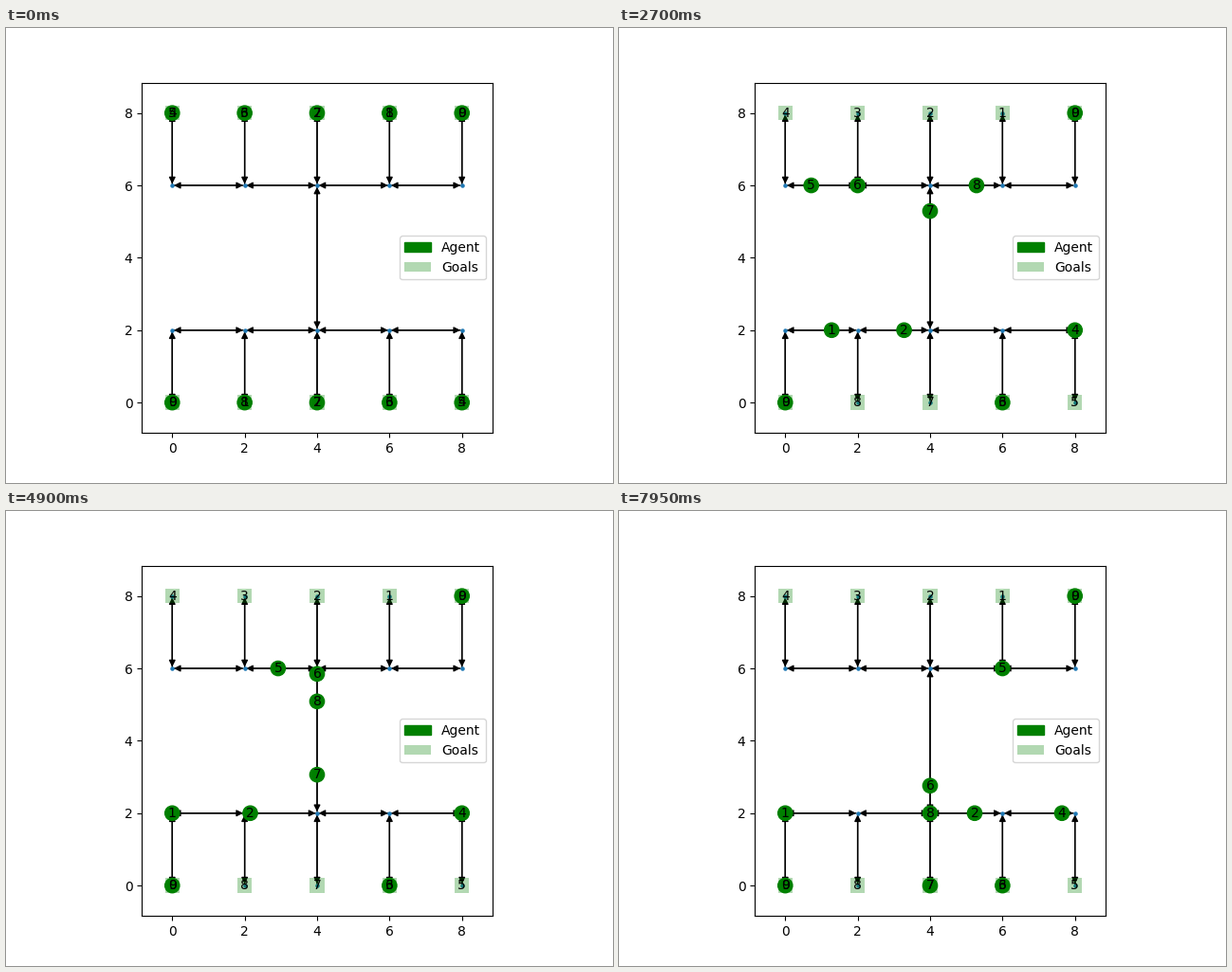
Recreate the animation shown at these times as a matplotlib script. Size 640 by 480 pixels, loop 8 s.

```python
import matplotlib.pyplot as plt
from matplotlib.animation import FuncAnimation
from matplotlib.patches import Circle, FancyArrowPatch, Patch, Rectangle

FRAMES, INTERVAL = 160, 50
PACE = 20  # frames per unit of edge length
NODE_SIZE = 5
COLUMNS = range(0, 9, 2)

STARTS = [(x, y) for y in (0, 8) for x in COLUMNS]
GOALS = STARTS[::-1]
HEADINGS = {"U": (0, 1), "D": (0, -1), "L": (-1, 0), "R": (1, 0)}

# one edge per letter, a number is a wait in frames
ROUTES = {1: "U L", 2: "U L 15 R R", 4: "U 112 L", 5: "D R R R",
          6: "D 15 R D", 7: "D D D", 8: "D L D"}


def position(agent, frame):
    x, y = STARTS[agent]
    for move in ROUTES.get(agent, "").split():
        if move.isdigit():
            frame -= int(move)
            continue
        if frame < 0:
            break
        # the bridge between the two rows is twice as long
        length = 4 if move == "D" and y == 6 else 2
        dx, dy = HEADINGS[move]
        span = PACE * length
        done = length * min(frame / (span - 1), 1)
        x, y = x + dx * done, y + dy * done
        frame -= span
    return x, y


def draw_edge(a, b):
    gap = NODE_SIZE ** 0.5 / 2
    for start, end in ((a, b), (b, a)):
        ax.add_patch(FancyArrowPatch(
            start, end, arrowstyle="-|>", mutation_scale=10, color="black",
            linewidth=1, shrinkA=gap, shrinkB=gap, zorder=1))


def label(number, pos):
    return ax.text(*pos, str(number), ha="center", va="center")


fig, ax = plt.subplots(figsize=(6.4, 4.8), dpi=100)
ax.set_aspect("equal")

for x in COLUMNS:
    draw_edge((x, 8), (x, 6))
    draw_edge((x, 0), (x, 2))
    if x < 8:
        for y in (2, 6):
            draw_edge((x, y), (x + 2, y))
draw_edge((4, 6), (4, 2))

nodes = [(x, y) for x in COLUMNS for y in (0, 2, 6, 8)]
ax.scatter(*zip(*nodes), s=NODE_SIZE, color="#1f78b4", linewidths=1, zorder=1)

for number, (x, y) in enumerate(GOALS):
    ax.add_patch(Rectangle((x - 0.2, y - 0.2), 0.4, 0.4,
                           facecolor="green", alpha=0.3))
    label(number, (x, y))

discs = [ax.add_patch(Circle(pos, 0.2, color="green")) for pos in STARTS]
tags = [label(number, pos) for number, pos in enumerate(STARTS)]

pad = 0.05 * 8
ax.update_datalim([(-pad, -pad), (8 + pad, 8 + pad)])
ax.autoscale_view()

ax.legend(handles=[Patch(color="green", label="Agent"),
                   Patch(facecolor="green", alpha=0.3, label="Goals")])


def update(frame):
    for agent, (disc, tag) in enumerate(zip(discs, tags)):
        pos = position(agent, frame)
        disc.center = pos
        tag.set_position(pos)
    return discs + tags


anim = FuncAnimation(fig, update, frames=FRAMES, interval=INTERVAL,
                     repeat=True, repeat_delay=0)
plt.show()
```
